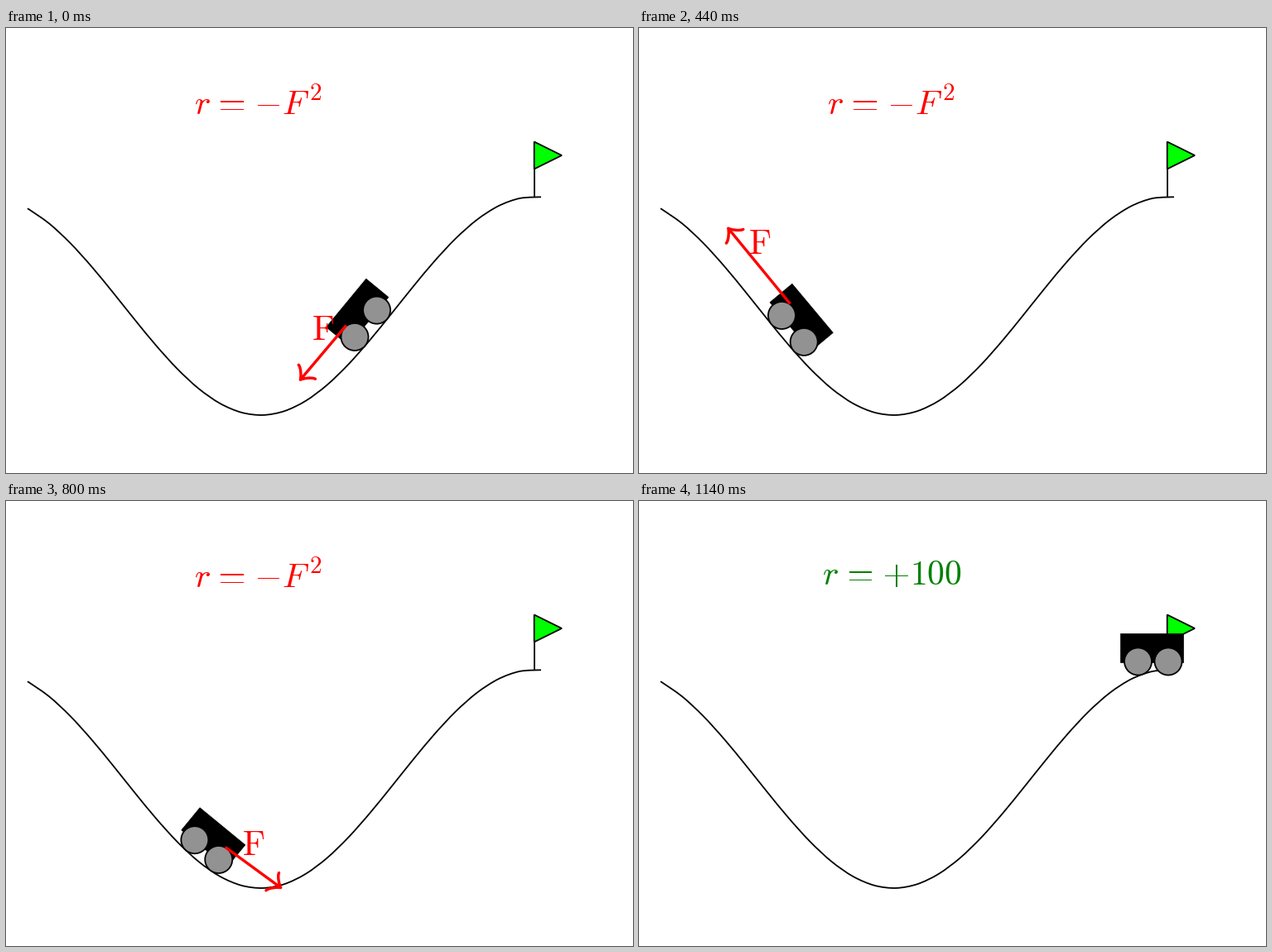
Animation, 757 px wide and 538 px high, one loop 1560 ms. Source, as a matplotlib script:

```python
import numpy as np
import matplotlib.pyplot as plt
from matplotlib.animation import FuncAnimation
from matplotlib.patches import Circle, PathPatch, Polygon, Rectangle
from matplotlib.path import Path

W, H, DPI = 757, 538, 100
FRAMES, INTERVAL = 78, 20
GOAL = 57                      # step at which the cart reaches the flag
PX = 72 / DPI                  # points per pixel
EM = 41.5                      # type size in pixels
THIN, BOLD = 1.8 * PX, 3.4 * PX
RED, GREEN, GREY = "#ff0000", "#008000", "#929292"

MID, AMP, BOTTOM, RATE = 336, 132, 307.5, 0.0095
RADIUS, BASE = 16.5, 36.5

plt.rcParams["mathtext.fontset"] = "cm"
fig = plt.figure(figsize=(W / DPI, H / DPI), dpi=DPI, facecolor="white")
ax = fig.add_axes([0, 0, 1, 1])
ax.set_xlim(0, W)
ax.set_ylim(H, 0)
ax.axis("off")


def hill(x):
    return MID + AMP * np.cos((x - BOTTOM) * RATE)


def slope(x):
    return -AMP * RATE * np.sin((x - BOTTOM) * RATE)


def smooth_path(x, y, tension=0.1526):
    """Bezier curve through the points, with gently rounded corners."""
    p = np.column_stack([x, y])
    d = np.zeros_like(p)
    d[1:-1] = tension * (p[2:] - p[:-2])
    verts = [p[0]]
    for i in range(len(p) - 1):
        verts += [p[i] + d[i], p[i + 1] - d[i + 1], p[i + 1]]
    return Path(verts, [Path.MOVETO] + [Path.CURVE4] * (len(verts) - 1))


# --- scenery ---
xs = np.linspace(26, 646, 25)
ax.add_patch(PathPatch(smooth_path(xs, hill(xs)), fill=False, lw=THIN, zorder=1))
ax.plot([637.7, 637.7], [204, 137.5], color="black", lw=THIN, zorder=2)
ax.add_patch(Polygon([(637.7, 137.5), (671, 154), (637.7, 170.5)],
                     fc="#00ff00", ec="black", lw=THIN, zorder=2))


# --- reward formulas, laid out in em units ---
def glyph(s, x, y, color, size=EM):
    return ax.text(x, y, f"${s}$", color=color, fontsize=size * PX,
                   ha="left", va="baseline", zorder=6)


def bar(x, y, x0, x1, y0, y1, color):
    return ax.add_patch(Rectangle((x + x0 * EM, y - y1 * EM), (x1 - x0) * EM,
                                  (y1 - y0) * EM, color=color, lw=0, zorder=6))


def r_equals(x, y, color):
    at = x + 0.729 * EM
    return [glyph("r", x, y, color),
            bar(at, y, 0.056, 0.722, 0.347, 0.387, color),
            bar(at, y, 0.056, 0.722, 0.113, 0.153, color)]


def cost_formula(x, y):
    return r_equals(x, y, RED) + [
        bar(x + 1.785 * EM, y, 0.083, 0.694, 0.23, 0.27, RED),
        glyph("F", x + 2.563 * EM, y, RED),
        glyph("2", x + 3.345 * EM, y - 0.413 * EM, RED, 0.7 * EM)]


def goal_formula(x, y):
    at = x + 1.785 * EM
    return r_equals(x, y, GREEN) + [
        bar(at, y, 0.056, 0.722, 0.23, 0.27, GREEN),
        bar(at, y, 0.369, 0.409, -0.083, 0.583, GREEN),
        glyph("100", x + 2.563 * EM, y, GREEN)]


cost = cost_formula(226.8, 104)
prize = goal_formula(221, 101)

# --- cart and force arrow ---
body = ax.add_patch(Polygon(np.zeros((4, 2)), fc="black", ec="black", lw=0.5, zorder=3))
wheels = [ax.add_patch(Circle((0, 0), RADIUS, fc=GREY, ec="black", lw=THIN, zorder=4))
          for _ in range(2)]
shaft, = ax.plot([], [], color=RED, lw=BOLD, solid_capstyle="butt", zorder=5)
head = ax.add_patch(PathPatch(Path([(0, 0)]), fill=False, ec=RED, lw=BOLD,
                              capstyle="round", joinstyle="round", zorder=5))
label = ax.text(0, 0, r"$\mathrm{F}$", color=RED, fontsize=EM * PX,
                ha="center", va="baseline", zorder=6)

# start step, x, speed, end step, x, speed
RIDE = [
    (0, 447, -6, 14, 287, -14.5),
    (14, 287, -14.5, 22, 173.2, -13.3),
    (22, 173.2, -13.3, 25, 136, -11.5),
    (25, 136, 0, 26, 136, 0),
    (26, 136, 0, 30, 144, 3.5),
    (30, 144, 3.5, 40, 232, 14),
    (40, 232, 26, 50, 517.5, 28),
    (50, 517.5, 16.5, 57, 621, 12.5),
]
PUSH_STEPS = [0, 14, 22, 24, 25, 28, 30, 33, 40, 50, 54, 56]
PUSH = [-86, -90, -118, -102, -80, 0, 0, 38, 83, 112, 105, 95]
HEAD = 3.3 * np.array([(-3.75, 4), (-3.5, 2.5), (-0.75, 0.25), (0, 0),
                       (-0.75, -0.25), (-3.5, -2.5), (-3.75, -4)])


def cart_x(n):
    for n0, x0, v0, n1, x1, v1 in RIDE:
        if n <= n1:
            break
    span = n1 - n0
    t = (n - n0) / span
    return ((1 + 2 * t) * (1 - t) ** 2 * x0 + t * (1 - t) ** 2 * span * v0
            + t * t * (3 - 2 * t) * x1 - t * t * (1 - t) * span * v1)


def wheel_centre(x):
    s = slope(x)
    return np.array([x, hill(x)]) + RADIUS * np.array([s, -1]) / np.hypot(s, 1)


def place_cart(left, right, ends=None):
    """Set wheels and body; return the cart's axes and its tilt in degrees."""
    along = (right - left) / np.linalg.norm(right - left)
    up = np.array([along[1], -along[0]])
    tilt = np.degrees(np.arctan2(-along[1], along[0]))
    back, front = ends or (15.8 - 0.085 * tilt + 0.0005 * tilt ** 2,
                           14.3 + 0.07 * tilt + 0.00128 * tilt ** 2)
    a, b = left - back * along, right + front * along
    body.set_xy([a - up, b - up, b + 34 * up, a + 34 * up])
    wheels[0].center, wheels[1].center = left, right
    return along, up, tilt


def place_arrow(start, angle, length):
    d = np.array([np.cos(angle), np.sin(angle)])
    tip = start + length * d
    end = tip - 1.5 * d
    shaft.set_data([start[0], end[0]], [start[1], end[1]])
    turn = np.array([d, (-d[1], d[0])])
    head.set_path(Path(HEAD @ turn + tip, [Path.MOVETO] + [Path.CURVE4] * 6))
    mid = (start + tip) / 2
    label.set_position((mid[0], mid[1] - 15))


def update(n):
    done = n >= GOAL
    for part in cost:
        part.set_visible(not done)
    for part in prize:
        part.set_visible(done)
    push = 0 if done else np.interp(n, PUSH_STEPS, PUSH)
    for part in (shaft, head, label):
        part.set_visible(abs(push) > 12)
    if done:
        place_cart(np.array([602.5, 194.0]), np.array([639.0, 194.0]), (21.5, 18))
        return

    x = cart_x(n)
    half = BASE / np.hypot(1, 0.75 * slope(x)) / 2
    left, right = wheel_centre(x - half), wheel_centre(x + half)
    along, up, tilt = place_cart(left, right)
    if push:
        lead, touch = (left, x - half) if push < 0 else (right, x + half)
        start = lead + 0.085 * tilt * along + 16.7 * up
        angle = 0.6 * np.arctan(slope(touch)) - 0.4 * np.radians(tilt)
        place_arrow(start, angle + (np.pi if push < 0 else 0), abs(push))


anim = FuncAnimation(fig, update, frames=FRAMES, interval=INTERVAL,
                     init_func=lambda: update(0), repeat=True, repeat_delay=0,
                     blit=False)
plt.show()
```
